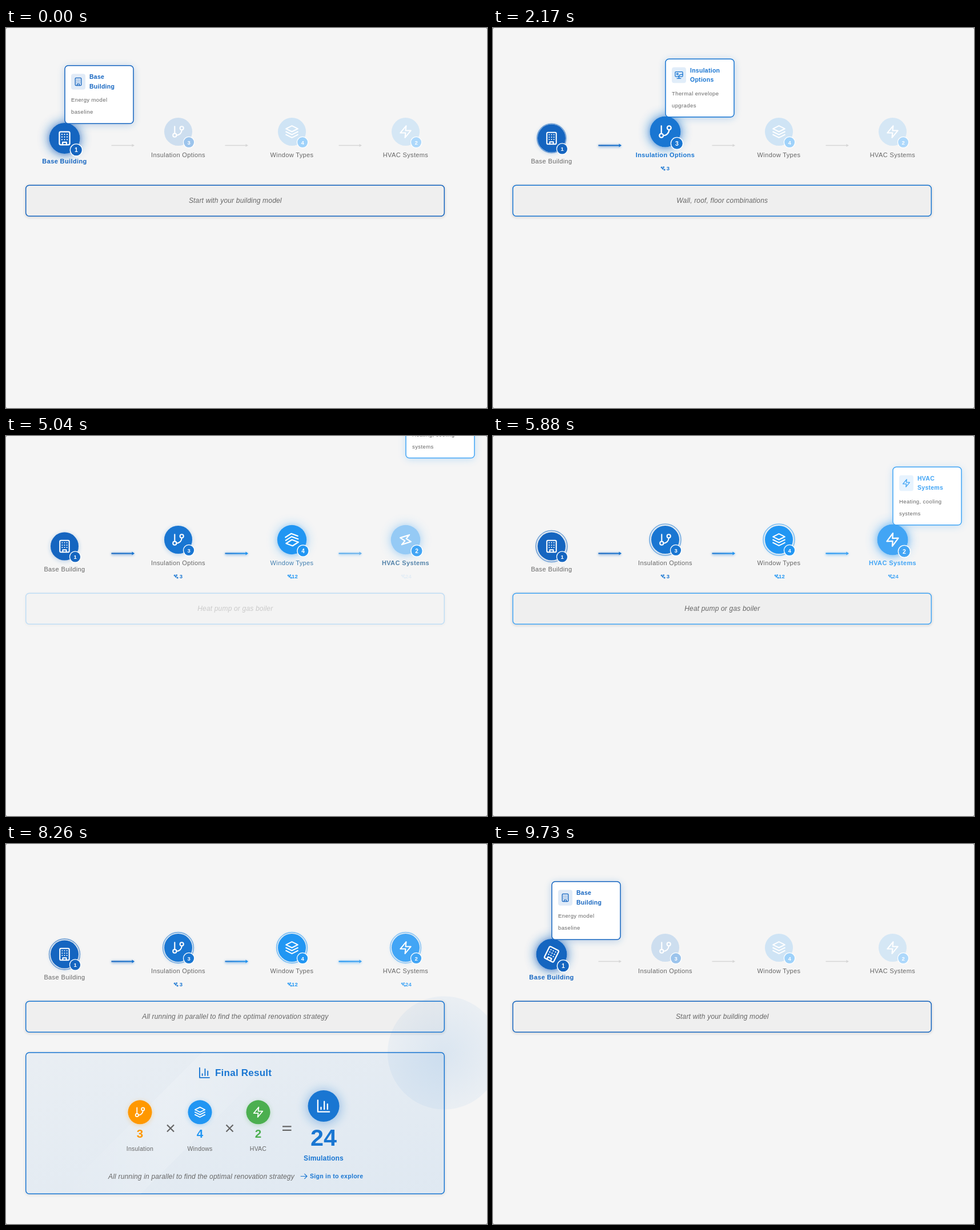
Write an HTML page that moves like this. It is 842 by 665 pixels and loops after 9.8 s.

```html
<!DOCTYPE html>
<html lang="en">
<head>
<meta charset="utf-8">
<title>Renovation options</title>
<style>
  html, body { margin: 0; width: 100%; height: 100%; overflow: hidden; background: #8a8a8a; }
  svg { display: block; width: 842px; height: 665px; }
  text { font-family: "Liberation Sans", Arial, Helvetica, sans-serif; }
  .mid { text-anchor: middle; }
  .bold { font-weight: 700; }
  .label { font-size: 11px; letter-spacing: .38px; }
  .say { font-size: 12px; font-style: italic; letter-spacing: .18px; fill: #666; }
  .icon { fill: none; stroke-width: 2; stroke-linecap: round; stroke-linejoin: round; }
</style>
</head>
<body>
<svg id="stage" viewBox="0 0 842 665"></svg>
<script>
const LOOP = 9800;
// moment the step switches, moment its springs start, step shown
const STEPS = [
  [770, 790, 1], [2870, 2885, 2], [4970, 4980, 3], [7070, 7124, 4], [9170, 9215, 0]
];
const BLUE = '#1976d2';
const ICON = {
  building: '<rect x="4" y="2" width="16" height="20" rx="2"/><path d="M9 22v-4h6v4M8 6h.01M12 6h.01M16 6h.01M8 10h.01M12 10h.01M16 10h.01M8 14h.01M12 14h.01M16 14h.01"/>',
  branch: '<path d="M6 3v12M18 9a9 9 0 0 1-9 9"/><circle cx="18" cy="6" r="3"/><circle cx="6" cy="18" r="3"/>',
  layers: '<path d="M12 2 2 7l10 5 10-5zM2 17l10 5 10-5M2 12l10 5 10-5"/>',
  bolt: '<path d="M13 2 3 14h9l-1 8 10-12h-9z"/>',
  chart: '<path d="M3 3v18h18M18 17V9M13 17V5M8 17v-3"/>',
  screen: '<rect x="2" y="3" width="20" height="13" rx="2"/><path d="M12 16v5M7 21h10M11 16c1-5 5-6 11-6"/><circle cx="8" cy="9" r="2"/>',
  cascade: '<path d="M6 10H4a2 2 0 0 1-2-2V4a2 2 0 0 1 2-2h4a2 2 0 0 1 2 2M9 15H8V10a2 2 0 0 1 2-2h4"/><rect x="13" y="13" width="9" height="9" rx="2"/>',
  arrow: '<path d="M3 12h18M14 5l7 7-7 7"/>'
};
const NODES = [
  { x: 102.5, y: 193, color: '#1565c0', icon: 'building', tipIcon: 'building', n: 1,
    name: ['Base', 'Building'], about: ['Energy model', 'baseline'] },
  { x: 301.5, y: 181.5, color: '#1976d2', icon: 'branch', tipIcon: 'screen', n: 3, total: 3,
    name: ['Insulation', 'Options'], about: ['Thermal envelope', 'upgrades'] },
  { x: 500.5, y: 181.5, color: '#2196f3', icon: 'layers', tipIcon: 'cascade', n: 4, total: 12,
    name: ['Window', 'Types'], about: ['Glazing performance', 'layers'] },
  { x: 699.5, y: 181.5, color: '#42a5f5', icon: 'bolt', tipIcon: 'bolt', n: 2, total: 24,
    name: ['HVAC', 'Systems'], about: ['Heating, cooling', 'systems'] }
];
const SAY = [
  'Start with your building model',
  'Wall, roof, floor combinations',
  'Single, double, triple glazing',
  'Heat pump or gas boiler',
  'All running in parallel to find the optimal renovation strategy'
];
const FACTORS = [
  [234.5, '#ff9800', 'branch', 3, 'Insulation'],
  [339.5, '#2196f3', 'layers', 4, 'Windows'],
  [441.5, '#4caf50', 'bolt', 2, 'HVAC']
];

const clamp = v => Math.max(0, Math.min(1, v));
const mix = (a, b, p) => a + (b - a) * p;
const wave = (t, period) => (1 - Math.cos(2 * Math.PI * t / period)) / 2;
function spring(stiff, damp, t) {
  if (t <= 0) return 0;
  if (t > 1) return 1;
  const k = damp / 2, w = Math.sqrt(stiff - k * k);
  return 1 - Math.exp(-k * t) * (Math.cos(w * t) + k / w * Math.sin(w * t));
}
function settle(w, t) {
  return t <= 0 ? 0 : 1 - (1 + w * t) * Math.exp(-w * t);
}
function blend(a, b, p) {
  const part = (c, i) => parseInt(c.substr(i, 2), 16);
  return `rgb(${[1, 3, 5].map(i => Math.round(mix(part(a, i), part(b, i), p)))})`;
}

const icon = (name, x, y, scale, color) =>
  `<g class="icon" stroke="${color}" transform="translate(${x} ${y}) scale(${scale}) translate(-12 -12)">${ICON[name]}</g>`;
const text = (s, x, y, cls, rest = '') => `<text x="${x}" y="${y}" class="${cls}" ${rest}>${s}</text>`;

function nodeMarkup(d, i) {
  const count = d.total ? `<g id="count${i}" fill="${d.color}">
    <g fill="none" stroke="${d.color}" stroke-width="1.1">
      <circle cx="${d.x - 6.3}" cy="244" r="1"/><circle cx="${d.x - 2.8}" cy="243.6" r=".8"/>
      <circle cx="${d.x - 4.3}" cy="246.3" r=".9"/><circle cx="${d.x - 1.4}" cy="248" r="1"/>
    </g>${text(d.total, d.x + (d.total > 9 ? -.5 : 2.2), 249, 'bold', 'font-size="9.5" letter-spacing=".3"')}</g>` : '';
  return `<g transform="translate(${d.x} ${d.y})">
    <circle id="ring${i}" fill="none" stroke="${d.color}" stroke-width="1.6" opacity=".55"/>
    <g id="body${i}">
      <circle id="glow${i}" r="25" fill="${d.color}" filter="url(#blur9)"/>
      <circle id="shade${i}" r="24" cy="1.5" fill="${d.color}" filter="url(#blur4)"/>
      <circle r="24.5" fill="#f5f5f5"/>
      <circle id="disc${i}" r="24.5" fill="${d.color}"/>
      <g id="spin${i}">${icon(d.icon, 0, 0, 1.03, '#fff')}</g>
      <g transform="translate(18.6 18.6)">
        <circle r="10.3" fill="#fff"/><circle id="badge${i}" r="9" fill="${d.color}"/>
        ${text(d.n, 0, 3.5, 'mid bold', 'font-size="9.6" fill="#fff"')}
      </g>
    </g></g>
    ${text(d.name.join(' '), d.x, d.y + 44, 'mid label', `id="label${i}"`)}${count}`;
}

function arrowMarkup(i) {
  const x = 184.5 + 199 * i, c = NODES[i].color;
  const shape = (color, w, h) => `<path d="M${x} 205.5h37" stroke="${color}" stroke-width="${w}"/>
    <path d="M${x + 36} ${205.5 - h}l4.5 ${h}-4.5 ${h}z" fill="${color}"/>`;
  return `${shape('#d6d6d6', 1.5, 2.6)}<g id="arrow${i}">
    <path d="M${x} 206.5h39" stroke="${c}" stroke-width="4" opacity=".45" filter="url(#blur2)"/>
    ${shape(`url(#line${i})`, 2.2, 3)}</g>`;
}

function tipMarkup(d, i) {
  const c = d.color;
  return `<g id="tip${i}">
    <rect width="120" height="101.5" y="2" rx="6" fill="${c}" opacity=".3" filter="url(#blur7)"/>
    <rect width="120" height="101.5" rx="6" fill="#fff" stroke="${c}" stroke-width="1.5"/>
    <rect x="11" y="14.5" width="25" height="27.5" rx="4" fill="${c}" opacity=".13"/>
    ${icon(d.tipIcon, 23.5, 28.3, .66, c)}
    ${d.name.map((s, k) => text(s, 43, 23.4 + 16.7 * k, 'bold', `font-size="10.5" letter-spacing=".27" fill="${c}"`)).join('')}
    ${d.about.map((s, k) => text(s, 11, 63.8 + 21 * k, '', 'font-size="9.5" letter-spacing=".4" fill="#666"')).join('')}
  </g>`;
}

function factorMarkup([x, color, name, n, label], i) {
  return `<g id="factor${i}">
    <circle cx="${x}" cy="471" r="21" fill="${color}" opacity=".3" filter="url(#blur4)"/>
    <circle cx="${x}" cy="469.3" r="21" fill="${color}"/>${icon(name, x, 469.3, .87, '#fff')}
    ${text(n, x, 514.3, 'mid bold', `font-size="20.5" fill="${color}"`)}
    ${text(label, x, 537, 'mid', 'font-size="10.5" letter-spacing=".24" fill="#666"')}</g>`;
}

function resultMarkup() {
  const times = x => `<path d="M${x - 6} 491.5l12 12m0-12l-12 12"/>`;
  return `<g id="result">
    <rect x="34.7" y="366" width="732.6" height="247.5" rx="6" fill="none" stroke="#000" stroke-width="2" opacity=".15" filter="url(#blur2)"/>
    <rect x="34.7" y="365" width="732.6" height="247.3" rx="6" fill="#f5f5f5"/>
    <rect x="34.7" y="365" width="732.6" height="247.3" rx="6" fill="url(#panel)" stroke="${BLUE}" stroke-width="1.5"/>
    <g clip-path="url(#inside)"><path id="sheen" d="M0 612L247 365h140L140 612z" fill="url(#soft)"/></g>
    <circle id="orb" cx="767" cy="365.5" fill="url(#halo)"/>
    ${icon('chart', 347.5, 400.3, .95, BLUE)}
    ${text('Final Result', 366, 406, 'bold', `font-size="17" letter-spacing=".25" fill="${BLUE}"`)}
    ${FACTORS.map(factorMarkup).join('')}
    <g stroke="#666" stroke-width="2.2">${times(288)}${times(391.5)}<path d="M484 494.3h15.5M484 500.9h15.5"/></g>
    <g id="sum">
      <circle cx="556" cy="460" r="30" fill="${BLUE}" opacity=".38" filter="url(#blur9)"/>
      <circle cx="556" cy="458.5" r="27.5" fill="${BLUE}"/>${icon('chart', 556, 458.5, 1.13, '#fff')}
      ${text('24', 556, 528.5, 'mid bold', `font-size="41.3" fill="${BLUE}"`)}
      ${text('Simulations', 556, 554.5, 'mid bold', `font-size="12" letter-spacing=".18" fill="${BLUE}"`)}
    </g>
    ${text(SAY[4], 342, 585.7, 'mid say')}
    <g id="go">${icon('arrow', 521.5, 581.5, .6, BLUE)}</g>
    ${text('Sign in to explore', 532, 585.2, 'bold', `font-size="10.5" letter-spacing=".3" fill="${BLUE}"`)}
  </g>`;
}

const blur = n => `<filter id="blur${n}" filterUnits="userSpaceOnUse" x="-100" y="-100" width="1042" height="865"><feGaussianBlur stdDeviation="${n}"/></filter>`;
const stop = (at, color, alpha) => `<stop offset="${at}" stop-color="${color}" stop-opacity="${alpha}"/>`;
const stage = document.getElementById('stage');
stage.innerHTML = `<defs>
  ${[2, 4, 7, 9].map(blur).join('')}
  ${[0, 1, 2].map(i => `<linearGradient id="line${i}" gradientUnits="userSpaceOnUse" x1="${184 + 199 * i}" x2="${225 + 199 * i}" y1="0" y2="0">${stop(0, NODES[i].color, 1)}${stop(1, NODES[i + 1].color, 1)}</linearGradient>`).join('')}
  <linearGradient id="panel" x2="1" y2="1">${stop(0, BLUE, .055)}${stop(1, BLUE, .1)}</linearGradient>
  <linearGradient id="soft">${stop(0, '#fff', 0)}${stop(.5, '#fff', .16)}${stop(1, '#fff', 0)}</linearGradient>
  <radialGradient id="halo">${stop(0, BLUE, .12)}${stop(1, BLUE, .05)}</radialGradient>
  <clipPath id="inside"><rect x="35" y="365.5" width="732" height="246.5" rx="6"/></clipPath>
</defs>
<rect width="842" height="665" rx="2.5" fill="#f5f5f5"/>
${[0, 1, 2].map(arrowMarkup).join('')}
${NODES.map(nodeMarkup).join('')}
<g id="note">
  <rect x="34.7" y="276" width="732.6" height="54.5" rx="6" fill="none" stroke="#000" stroke-width="2" opacity=".22" filter="url(#blur2)"/>
  <rect id="frame" x="34.7" y="275.2" width="732.6" height="54" rx="6" fill="#efefef" stroke-width="1.5"/>
  ${text('', 401.3, 305.6, 'mid say', 'id="words"')}
</g>
${resultMarkup()}
${NODES.map(tipMarkup).join('')}`;

const parts = {};
stage.querySelectorAll('[id]').forEach(e => parts[e.id] = e);
const set = (id, attrs) => {
  for (const k in attrs) parts[id].setAttribute(k, attrs[k]);
};
const show = (id, on) => set(id, { display: on ? 'inline' : 'none' });
const zoom = (x, y, s) => `translate(${x} ${y}) scale(${s}) translate(${-x} ${-y})`;

function drawNode(d, i, step, prev, t, since) {
  const active = step === i, was = prev === i, done = step > i;
  const p = spring(550, 30, t);
  const lit = s => s >= i ? 1 : 0;
  const alpha = mix(lit(prev), lit(step), settle(24, t));
  const focus = mix(was ? 1 : 0, active ? 1 : 0, p);
  let turn = 0;
  if (active) turn = 360 * spring(100, 10, t - .015);
  else if (was) turn = 360 * (1 - spring(500, 25, t));
  set('body' + i, { transform: `scale(${1 + .1 * focus})` });
  set('spin' + i, { transform: `rotate(${turn})` });
  set('disc' + i, { opacity: mix(.18, 1, alpha) });
  set('badge' + i, { opacity: lit(step) ? 1 : .43 });
  set('glow' + i, { opacity: .8 * clamp(focus) });
  set('shade' + i, { opacity: .32 * alpha });
  show('ring' + i, done);
  set('ring' + i, { r: 23.7 + 3.8 * wave(Math.max(0, t), 1.8) });
  const hue = mix(was ? 1 : 0, active ? 1 : 0, clamp(since / .15));
  set('label' + i, { 'font-weight': active ? 700 : 400, fill: blend('#666666', d.color, hue) });
  if (d.total) {
    show('count' + i, lit(step));
    set('count' + i, { opacity: active ? clamp((t - .03) / .3) : 1 });
  }
  show('tip' + i, active);
  set('tip' + i, { transform: `translate(${d.x + .5} ${d.y - 127.3 - 230 * (1 - settle(27, t))})` });
}

function drawResult(t) {
  show('result', t >= 0);
  if (t < 0) return;
  set('result', { transform: zoom(401, 488.6, settle(15, t - .023)) });
  set('orb', { r: 84 * (1 + .2 * wave(t, 3)) });
  set('sheen', { transform: `translate(${-420 + 1300 * (t % 3) / 3} 0)` });
  FACTORS.forEach((f, i) =>
    set('factor' + i, { transform: zoom(f[0], 495, settle(18, t - .15 - .1 * i)) }));
  set('sum', { transform: zoom(556, 495, settle(18, t - .45)) });
  set('go', { transform: `translate(${2.5 * wave(t, 1.2)} 0)` });
}

function draw(time) {
  let step = 0, since = 2 + time / 1000, t = since;
  for (const [at, begin, n] of STEPS) {
    if (time < at) break;
    step = n;
    since = (time - at) / 1000;
    t = (time - begin) / 1000;
  }
  const prev = (step + 4) % 5;
  NODES.forEach((d, i) => drawNode(d, i, step, prev, t, since));
  for (let i = 0; i < 3; i++)
    set('arrow' + i, { opacity: mix(prev > i ? 1 : 0, step > i ? 1 : 0, clamp(since / .1)) });
  set('note', { opacity: clamp(since / .24) });
  set('frame', { stroke: step === 4 ? BLUE : NODES[step].color });
  if (parts.words.textContent !== SAY[step]) parts.words.textContent = SAY[step];
  drawResult(step === 4 ? since : -1);
}

const start = performance.now();
function tick() {
  draw((performance.now() - start) % LOOP);
  requestAnimationFrame(tick);
}
tick();
</script>
</body>
</html>
```
